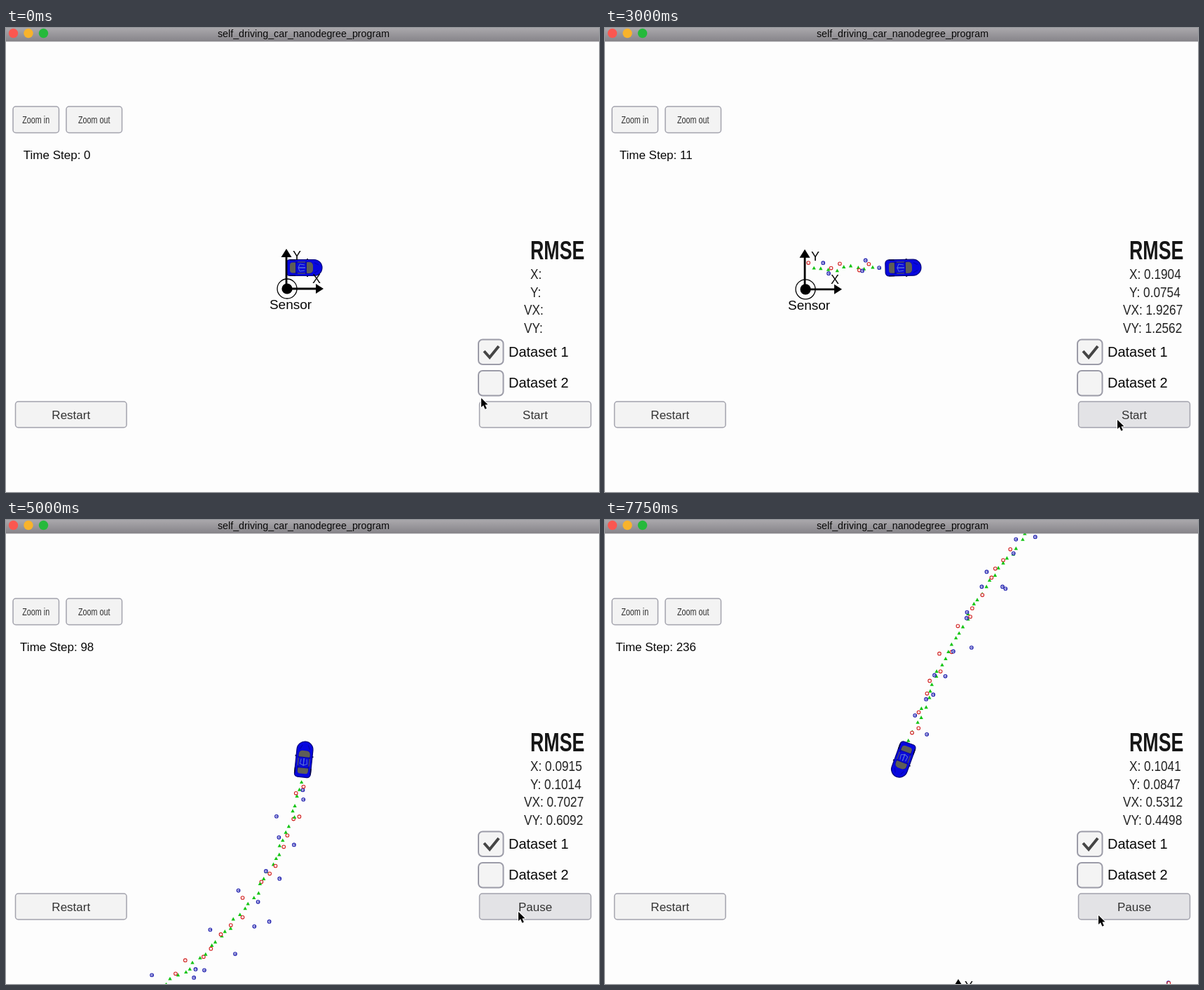
An HTML page with a canvas that plays this animation: 846 by 662 pixels, repeating every 8 s.

```html
<!DOCTYPE html>
<html lang="en">
<head>
<meta charset="utf-8">
<title>Sensor tracking</title>
<style>
  html, body { margin: 0; width: 100%; height: 100%; overflow: hidden; background: #fdfdfd; }
  canvas { display: block; }
</style>
</head>
<body>
<canvas id="stage" width="846" height="662"></canvas>
<script>
const ctx = document.getElementById('stage').getContext('2d');
const LOOP = 8000, TICK = 250;
const CAR = { x: 425, y: 342 };
const SPEED = 10.45, LAST_STEP = 236;
const SANS = '"Liberation Sans", Arial, sans-serif';
const INK = '#080808', BLUE = '#1818ac', RED = '#d32525', GREEN = '#12c412';

// Keyframes: [key, ...values]
const STEPS = [[2750, 0], [3000, 11], [4000, 49], [7750, LAST_STEP]];
const CURSOR = [[0, 678, 528], [1000, 731, 559], [5250, 731, 559], [6500, 704, 564]];
const RMSE = [
  [11, .1904, .0754, 1.9267, 1.2562],
  [49, .0956, .1038, .9270, .6903],
  [98, .0915, .1014, .7027, .6092],
  [186, .1018, .0876, .5647, .4927],
  [LAST_STEP, .1041, .0847, .5312, .4498],
];

const clamp = v => Math.min(1, Math.max(0, v));

function sample(keys, at) {
  const next = keys.findIndex(k => k[0] > at);
  if (next === 0) return keys[0].slice(1);
  if (next < 0) return keys[keys.length - 1].slice(1);
  const a = keys[next - 1], b = keys[next], f = (at - a[0]) / (b[0] - a[0]);
  return a.slice(1).map((v, j) => v + (b[j + 1] - v) * f);
}

let seed = 29;
const random = () => (seed = (seed * 16807) % 2147483647) / 2147483647;
const gauss = () => (random() + random() + random() + random() - 2) * 1.73;

// The car turns left through 252 degrees, slowly at both ends.
const headingAt = step => .7 * Math.PI * (1 - Math.cos(Math.PI * step / 250));

// Car positions relative to the sensor, in screen pixels.
function drivePath() {
  const path = [{ x: 24, y: -30 }];
  for (let i = 0; i < LAST_STEP; i++) {
    const a = headingAt(i + .5), { x, y } = path[i];
    path.push({ x: x + SPEED * Math.cos(a), y: y - SPEED * Math.sin(a) });
  }
  // Spread the leftover drift over the long left turn.
  const end = path[LAST_STEP], dx = -80 - end.x, dy = -370 - end.y;
  return path.map(({ x, y }, i) => {
    const f = clamp((i - 98) / 45);
    return { x: x + dx * f, y: y + dy * f };
  });
}

// Every step has a filtered estimate; lidar and radar readings alternate.
function measure(p, i) {
  const a = headingAt(i);
  const x = p.x - 12 * Math.cos(a), y = p.y + 12 * Math.sin(a);
  const near = spread => ({ x: x + gauss() * spread, y: y + gauss() * spread });
  const estimate = near(1.7), radar = i % 2 === 1;
  if (!radar) return { estimate, radar, hit: near(4.5) };
  const r = Math.hypot(x, y) + gauss() * 10, b = Math.atan2(y, x) + gauss() * .028;
  return { estimate, radar, hit: { x: r * Math.cos(b), y: r * Math.sin(b) } };
}

const path = drivePath();
const markers = path.map(measure);

function text(str, x, y, size, { align = 'left', color = INK, weight = '', squeeze = 1 } = {}) {
  ctx.save();
  ctx.translate(x, y);
  ctx.scale(squeeze, 1);
  ctx.font = `${weight} ${size}px ${SANS}`;
  ctx.textAlign = align;
  ctx.fillStyle = color;
  ctx.fillText(str, 0, 0);
  ctx.restore();
}

function paint(fill, stroke, width) {
  if (fill) {
    ctx.fillStyle = fill;
    ctx.fill();
  }
  if (stroke) {
    ctx.strokeStyle = stroke;
    ctx.lineWidth = width;
    ctx.stroke();
  }
}

function poly(points, fill, stroke, width = 1) {
  ctx.beginPath();
  points.forEach(([x, y]) => ctx.lineTo(x, y));
  if (fill) ctx.closePath();
  paint(fill, stroke, width);
}

function disc(x, y, r, fill, stroke, width = 1) {
  ctx.beginPath();
  ctx.arc(x, y, r, 0, 2 * Math.PI);
  paint(fill, stroke, width);
}

function box(x, y, w, h, radius, fill, stroke, width = 1.5) {
  ctx.beginPath();
  ctx.roundRect(x, y, w, h, radius);
  paint(fill, stroke, width);
}

function drawMarker({ estimate: e, radar, hit }) {
  const color = radar ? BLUE : RED;
  poly([[e.x - 2.7, e.y + 2.2], [e.x, e.y - 2.7], [e.x + 2.7, e.y + 2.2]], GREEN);
  disc(hit.x, hit.y, 2.3, '#fdfdfd', color, 1.1);
  if (radar) poly([[hit.x - 1, hit.y], [hit.x + 2, hit.y]], null, color);
}

function drawCar(step) {
  ctx.save();
  ctx.translate(CAR.x, CAR.y);
  ctx.rotate(-headingAt(step));
  poly([[5, -13], [5, 13]], null, '#05052c', 2);
  box(-25, -11.5, 51, 23, [5, 12, 12, 5], '#0707df', '#04047a', 1.2);
  box(-19, -8.5, 32, 17, 5, '#0808a4');
  box(-20, -7.5, 8, 15, [4, 1, 1, 4], '#5e5e58');
  box(4, -8, 9, 16, [1, 5, 5, 1], '#5e5e58');
  box(-11, -7, 14, 14, 2, '#0a0ad8');
  for (const side of [-1, 1]) {
    poly([[-20, side * 11.3], [-12, side * 11.3]], null, '#05053c', 1.5);
    poly([[-9, side * 8], [2, side * 8]], null, '#50506a', 1.3);
    poly([[1, side * 4], [-6, side * 5], [-8, 0], [2, 0]], null, '#5a72d8');
    poly([[15, side * 7], [21, side * 4]], null, '#0505a8');
  }
  ctx.restore();
}

function drawSensor() {
  disc(0, 0, 14, null, '#000', 1.3);
  disc(0, 0, 7.6, '#000');
  poly([[-1, 0], [-1, -47]], null, '#000', 2.8);
  poly([[0, 0], [43, 0]], null, '#000', 2.8);
  poly([[-8.5, -45], [-1, -57], [6.5, -45]], '#000');
  poly([[41, -7], [52, 0], [41, 7]], '#000');
  text('Y', 14, -41, 18, { align: 'center' });
  text('X', 42, -8, 18, { align: 'center' });
  text('Sensor', 5, 29, 19, { align: 'center' });
}

function drawWorld(step) {
  ctx.save();
  ctx.translate(CAR.x - path[step].x, CAR.y - path[step].y);
  markers.slice(0, Math.max(0, step - 1)).forEach(drawMarker);
  ctx.restore();
  drawCar(step);
  ctx.save();
  ctx.translate(CAR.x - path[step].x, CAR.y - path[step].y);
  drawSensor();
  ctx.restore();
}

function button(label, x, y, w, h, fill = '#f3f3f3', size = 17, squeeze = 1) {
  box(x, y, w, h, 4, fill, '#a3a3ad');
  text(label, x + w / 2, y + h / 2 + size * .36, size, { align: 'center', color: '#333', squeeze });
}

function startFill(t) {
  if (t < 500) return '#f3f3f3';
  return t >= 1250 && t < 1750 ? '#d9d9dc' : '#e3e3e6';
}

function drawPanel(t, step) {
  button('Zoom in', 10, 112, 65.5, 37.5, '#f3f3f3', 15, .72);
  button('Zoom out', 86, 112, 79.5, 37.5, '#f3f3f3', 15, .72);
  text('Time Step: ' + step, 72.7, 187, 17, { align: 'center' });

  text('RMSE', 748, 330, 37, { weight: 'bold', squeeze: .725, color: '#161616' });
  const errors = sample(RMSE, step);
  ['X', 'Y', 'VX', 'VY'].forEach((name, i) => {
    const value = step ? ' ' + errors[i].toFixed(4) : '';
    text(name + ':' + value, i < 2 ? 748 : 739, 358 + i * 25.6, 21, { squeeze: .82, color: '#222' });
  });

  for (const i of [0, 1]) {
    const y = 444.5 + i * 44.5;
    box(674, y, 35.5, 35.5, 6, '#f4f4f4', '#9c9ca8', 2);
    text('Dataset ' + (i + 1), 717, y + 24, 20);
  }
  poly([[682, 461], [690, 470], [703, 454]], null, '#454545', 4);

  button('Restart', 13.5, 533, 158.5, 37);
  button(t < 3250 ? 'Start' : 'Pause', 675.5, 533, 159, 37, startFill(t));
}

function drawTitleBar() {
  const shade = ctx.createLinearGradient(0, 0, 0, 19);
  shade.addColorStop(0, '#aaa8ac');
  shade.addColorStop(1, '#868489');
  ctx.fillStyle = shade;
  ctx.fillRect(0, 0, 846, 19.4);
  ['#fb5750', '#f8b32b', '#25b93b'].forEach((color, i) => {
    disc(10.5 + i * 21.5, 7.5, 6.7, color);
  });
  text('self_driving_car_nanodegree_program', 424.5, 12.5, 14.27, { align: 'center' });
}

function drawCursor([x, y]) {
  ctx.save();
  ctx.translate(x, y);
  ctx.lineJoin = 'round';
  const arrow = [[0, 0], [0, 13], [3, 10.2], [5.4, 15.8], [7.8, 14.8], [5.4, 9.4], [9.4, 9.2]];
  poly(arrow, '#000', '#fff', 2);
  poly(arrow, '#000');
  ctx.restore();
}

function draw(now) {
  const t = Math.floor((now % LOOP) / TICK) * TICK;
  const step = Math.floor(sample(STEPS, t)[0]);
  ctx.fillStyle = '#fdfdfd';
  ctx.fillRect(0, 0, 846, 662);
  drawWorld(step);
  drawPanel(t, step);
  drawTitleBar();
  drawCursor(sample(CURSOR, t));
}

const start = performance.now();
function frame() {
  draw(performance.now() - start);
  requestAnimationFrame(frame);
}
frame();
</script>
</body>
</html>
```
